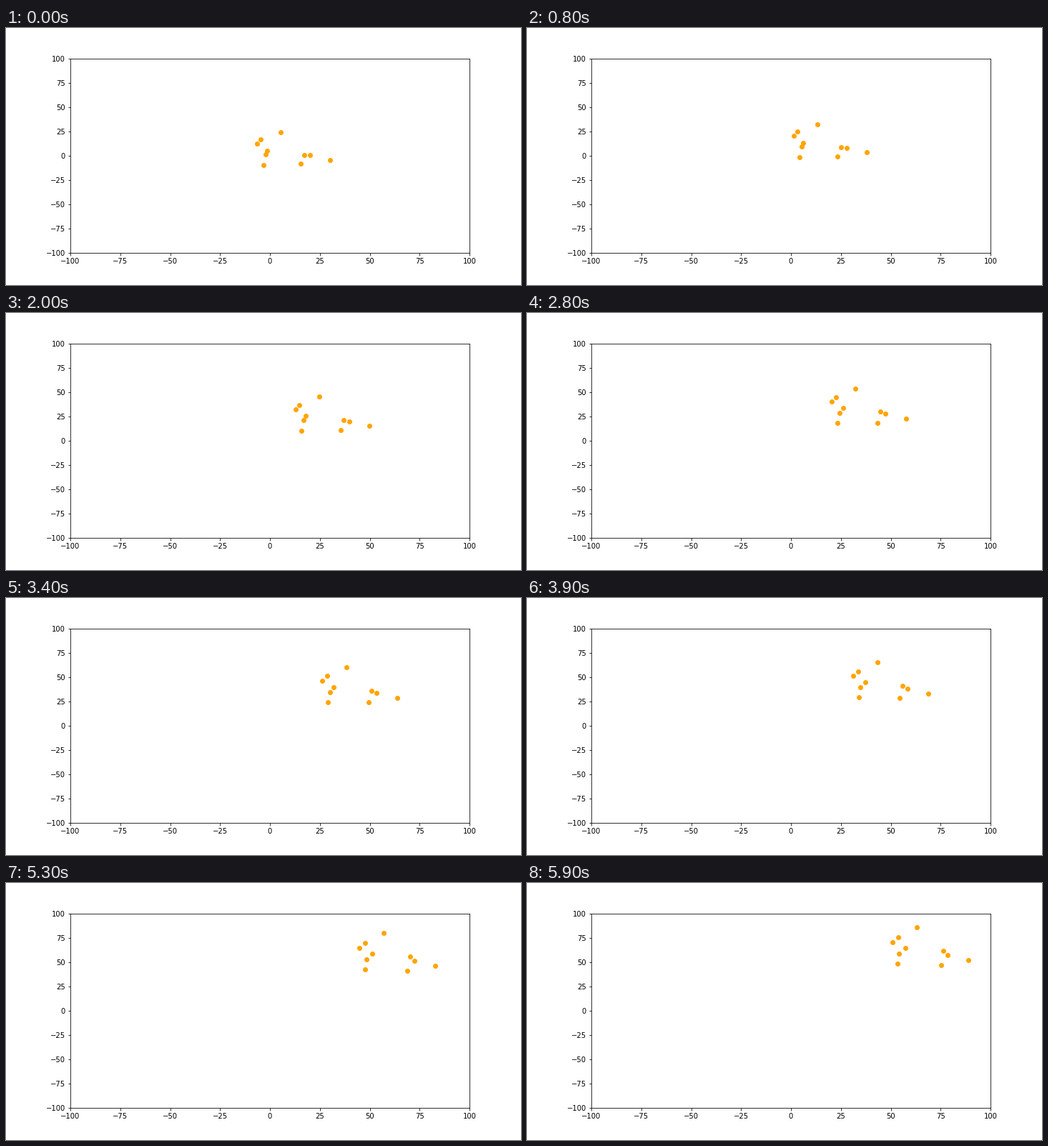
Recreate the animation shown at these times as a matplotlib script. Size 720 by 360 pixels, loop 6000 ms.

```python
import numpy as np
import matplotlib.pyplot as plt
from matplotlib.animation import FuncAnimation

FRAMES = 60
LIMIT = 100

# Each dot travels from its start to its end along a slightly bowed path.
START = np.array([
    (-6.3, 12.4), (-4.6, 16.7), (5.5, 24.0), (-1.6, 5.0), (-2.0, 1.3),
    (-3.1, -9.6), (15.4, -8.1), (17.3, 0.6), (20.2, 0.6), (30.2, -4.4),
])
END = np.array([
    (50.9, 70.7), (53.8, 76.0), (63.1, 86.2), (57.5, 64.8), (54.1, 59.0),
    (53.4, 48.6), (75.2, 47.0), (76.2, 61.9), (78.5, 57.5), (88.9, 52.3),
])
BOW = np.array([-0.4, 0.4])


def positions(i):
    t = i / (FRAMES - 1)
    return START + (END - START) * t + BOW * np.sin(np.pi * t)


fig, ax = plt.subplots(figsize=(10, 5), dpi=72)
fig.subplots_adjust(left=0.125, right=0.9, bottom=0.125, top=0.88)
ticks = range(-LIMIT, LIMIT + 1, 25)
ax.set(xlim=(-LIMIT, LIMIT), ylim=(-LIMIT, LIMIT), xticks=ticks, yticks=ticks)
dots = ax.scatter(*START.T, color="orange")


def update(i):
    dots.set_offsets(positions(i))
    return (dots,)


anim = FuncAnimation(fig, update, frames=FRAMES, interval=100, repeat=True)
plt.show()
```
